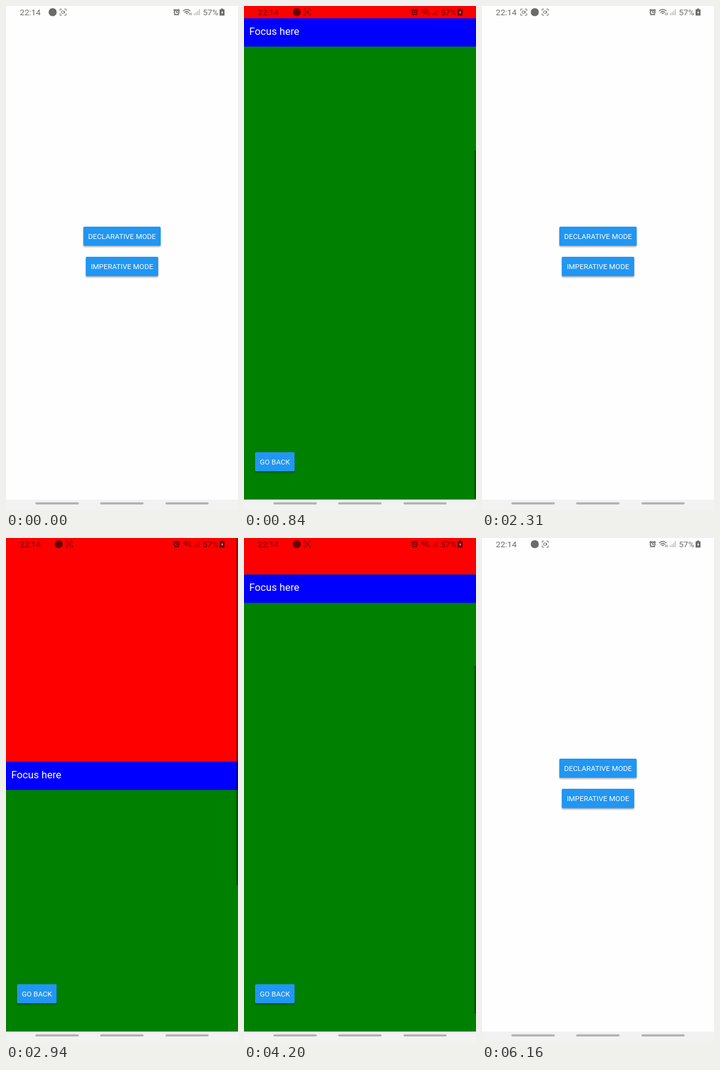
Write an HTML page that moves like this. It is 378x820 px and loops after 6.44 s.

```html
<!DOCTYPE html>
<html lang="en">
<head>
<meta charset="utf-8">
<title>Scroll focus demo</title>
<style>
  html, body { margin: 0; width: 100%; height: 100%; overflow: hidden; background: #fefefe; }
  svg { display: block; width: 100%; height: 100%; }
  text { font-family: Roboto, sans-serif; }
  .button rect { fill: #2196f3; filter: drop-shadow(0 2px 1.2px rgba(0, 0, 0, .32)); }
  .button text { fill: #fff; font-size: 11.75px; text-anchor: middle; }
  .button.pressed rect { fill: #1e86d9; filter: none; }
  #status { opacity: .58; }
  #status text { font-size: 13.6px; }
  .line { fill: none; stroke: #000; }
</style>
</head>
<body>
<svg viewBox="0 0 378 820">
  <defs>
    <g id="recorder" class="line">
      <path d="M-5-2V-5H-2M2-5H5V-2M5 2V5H2M-2 5H-5V2"/>
      <rect x="-2.5" y="-2" width="4" height="4" rx="1"/>
      <path d="M2.5-1.5V1.5"/>
    </g>
  </defs>

  <g id="menu">
    <rect width="378" height="803" fill="#fefefe"/>
    <g id="declarative" class="button">
      <rect x="126" y="359" width="126" height="31" rx="1.8"/>
      <text x="189" y="379">DECLARATIVE MODE</text>
    </g>
    <g id="imperative" class="button">
      <rect x="130" y="408" width="118" height="31.5" rx="1.8"/>
      <text x="189" y="428.3">IMPERATIVE MODE</text>
    </g>
  </g>

  <g id="page">
    <rect width="378" height="803" fill="#008000"/>
    <g id="content">
      <rect width="378" height="364" fill="#f00"/>
      <rect y="364" width="378" height="46" fill="#00f"/>
      <text x="8.5" y="391" font-size="16.7" fill="#fff">Focus here</text>
    </g>
    <rect id="scrollbar" x="375" width="3" height="566" fill="#000"/>
    <g id="back" class="button">
      <rect x="18" y="726" width="64.5" height="31" rx="1.8"/>
      <text x="50.3" y="745.8">GO BACK</text>
    </g>
  </g>

  <g id="status">
    <text x="22.5" y="15">22:14</text>
    <use id="blinker" href="#recorder" x="68" y="10"/>
    <g id="notices">
      <circle cx="86" cy="10" r="6.6"/>
      <use href="#recorder" x="103" y="10"/>
    </g>
    <circle cx="278" cy="10.3" r="3.8" class="line" stroke-width="1.8"/>
    <path d="M273 7.5L275.5 5M283 7.5L280.5 5M274.5 15L275.5 13.5M281.5 15L280.5 13.5M278 8V10.5H280" class="line" stroke-width="1.5"/>
    <path d="M288.5 8.2Q294.5 2.8 300.5 8.2M290.7 10.5Q294.5 7 298.3 10.5M292.8 12.6Q294.5 11 296.2 12.6" class="line" stroke-width="1.4"/>
    <path d="M299 11V15M301.5 11V15" class="line"/>
    <path d="M307 15V12M309.7 15V10M312.4 15V8M315.1 15V5" class="line" stroke-width="1.5" opacity=".45"/>
    <text x="320.7" y="15">57%</text>
    <path d="M350.5 4H353.5V5.5H356V15.5H348V5.5H350.5Z"/>
    <path d="M353 7L350.5 11H352L351.3 14L354 10H352.4Z" fill="#fff"/>
  </g>

  <rect y="803" width="378" height="17" fill="#f2f2f2"/>
  <path d="M49.5 809.3H117M155 809.3H222.5M261.5 809.3H328.5" fill="none" stroke="#b2b2b2" stroke-width="3.4" stroke-linecap="round"/>
</svg>

<script>
const LOOP = 6440, STEP = 70, MAX_SCROLL = 344;
const visits = [
  { open: 210, close: 1680, hideBar: 1410 },
  { open: 2870, close: 5530, hideBar: 4830, scrollAt: 4005 }
];
const presses = { declarative: [70, 210], imperative: [2730, 2870], back: [1540, 1680, 5460, 5530] };
const blinkOn = [70, 1190, 2240, 3220, 4270, 5390];
const blinkOff = [560, 1680, 2730, 3710, 4830, 5880];

const $ = id => document.getElementById(id);
const progress = (t, start, length) => Math.min(1, Math.max(0, (t - start) / length));
const ease = x => (1 - Math.cos(Math.PI * x)) / 2;
const show = (id, on) => $(id).style.display = on ? '' : 'none';

function drawPage(t, visit) {
  const scroll = MAX_SCROLL * (visit.scrollAt ? ease(progress(t, visit.scrollAt, 250)) : 1);
  $('content').setAttribute('transform', `translate(0 ${-scroll})`);
  $('scrollbar').setAttribute('y', scroll * 236 / MAX_SCROLL - 1);
  $('scrollbar').style.opacity = .32 * (1 - progress(t, visit.hideBar, 250));
}

function drawStatus(t) {
  const alpha = blinkOn.reduce((sum, on, i) =>
    sum + progress(t, on - STEP, 140) - progress(t, blinkOff[i] - STEP, 250), 0);
  $('blinker').style.opacity = alpha;
  $('notices').setAttribute('transform', `translate(${-10 * (1 - progress(t, 0, 140))} 0)`);
}

function draw(t) {
  const visit = visits.find(v => t >= v.open && t < v.close);
  show('menu', !visit);
  show('page', visit);
  if (visit) drawPage(t, visit);
  for (const [id, times] of Object.entries(presses)) {
    const pressed = times.filter(time => t >= time).length % 2 === 1;
    $(id).classList.toggle('pressed', pressed);
  }
  drawStatus(t);
}

const start = performance.now();
function tick() {
  const t = (performance.now() - start) % LOOP;
  draw(Math.floor(t / STEP) * STEP);
  requestAnimationFrame(tick);
}
tick();
</script>
</body>
</html>
```
